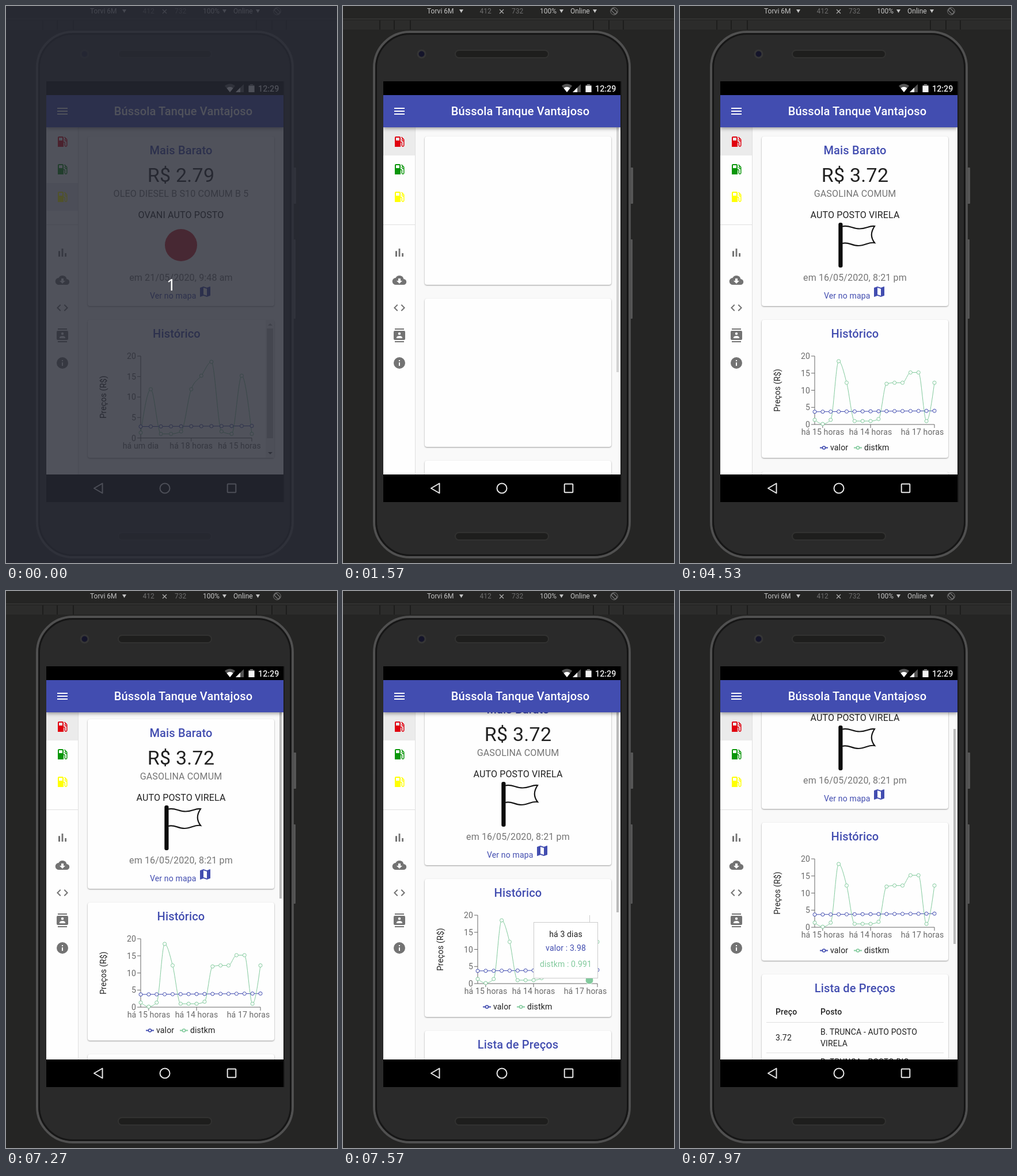
Recreate the animation shown at these times as an HTML page. Size 575 by 969 pixels, loop 8000 ms.

```html
<!DOCTYPE html>
<html lang="pt">
<head>
<meta charset="utf-8">
<style>
html, body { margin: 0; width: 100%; height: 100%; overflow: hidden; background: #252524; }
svg { display: block; width: 575px; height: 969px; font-family: Roboto, sans-serif; }
text { white-space: pre; }
.title { font-size: 20px; font-weight: 500; letter-spacing: .15px; fill: #424db0; }
.price { font-size: 34px; letter-spacing: .25px; fill: #212121; }
.body { font-size: 16px; letter-spacing: .15px; fill: #212121; }
.soft { fill: #757575; }
.small { font-size: 14px; letter-spacing: .15px; fill: #212121; }
.axis { fill: #6a6a6a; }
.blue { fill: #424db0; }
.green { fill: #82ca9d; }
.bold { font-weight: 500; }
.tool { font-size: 12px; fill: #c4c4c4; }
.dim { fill: #6e6e6e; }
.card { fill: #fefefe; filter: drop-shadow(0 1px 1px rgba(0,0,0,.38)); }
.bar { fill: #424db0; filter: drop-shadow(0 2px 3px rgba(0,0,0,.4)); }
</style>
</head>
<body>
<svg id="stage" viewBox="0 0 575 969"></svg>
<script>
const BLUE = '#424db0', GREEN = '#82ca9d', GREY = '#737373';

const rect = (x, y, w, h, fill, more = '') =>
  `<rect x="${x}" y="${y}" width="${w}" height="${h}" fill="${fill}" ${more}/>`;
const path = (d, fill, more = '') => `<path d="${d}" fill="${fill}" ${more}/>`;
const line = (d, color, width = 1, more = '') =>
  path(d, 'none', `stroke="${color}" stroke-width="${width}" ${more}`);
const circle = (x, y, r, fill, more = '') =>
  `<circle cx="${x}" cy="${y}" r="${r}" fill="${fill}" ${more}/>`;
const text = (x, y, str, cls, anchor = 'middle', more = '') =>
  `<text x="${x}" y="${y}" class="${cls}" text-anchor="${anchor}" ${more}>${str}</text>`;
const group = (id, inner, more = '') => `<g id="${id}" ${more}>${inner}</g>`;
const icon = (d, x, y, fill) => path(d, fill, `transform="translate(${x} ${y})"`);
const card = (y, h) => rect(142, y, 324, h, '#fefefe', 'class="card" rx="4"');
const caret = x => path(`M${x} 6h7l-3.5 6z`, '#c4c4c4');

const ICONS = {
  menu: 'M3 18h18v-2H3zm0-5h18v-2H3zm0-7v2h18V6z',
  gas: 'M19.77 7.23l-3.71-3.73L15 4.56l2.11 2.11a2.5 2.5 0 0 0 1.89 4.62v7.21a1 1 0 0 1-2 0V14a2 2 0 0 0-2-2h-1V5a2 2 0 0 0-2-2H6a2 2 0 0 0-2 2v16h10v-7.5h1.5v5a2.5 2.5 0 0 0 5 0V9a2.5 2.5 0 0 0-.73-1.77zM12 10H6V5h6zm6 0a1 1 0 1 1 0-2 1 1 0 0 1 0 2z',
  bars: 'M5 9.2h3V19H5zM10.6 5h2.8v14h-2.8zM16.2 13H19v6h-2.8z',
  cloud: 'M19.4 10A7.5 7.5 0 0 0 5.4 8 6 6 0 0 0 6 20h13a5 5 0 0 0 .4-10zM17 13l-5 5-5-5h3V9h4v4z',
  code: 'M9.4 16.6L4.8 12l4.6-4.6L8 6l-6 6 6 6zM14.6 16.6l4.6-4.6-4.6-4.6L16 6l6 6-6 6z',
  contact: 'M20 0H4v2h16zM4 24h16v-2H4zM20 4H4a2 2 0 0 0-2 2v12a2 2 0 0 0 2 2h16a2 2 0 0 0 2-2V6a2 2 0 0 0-2-2zm-8 2.75a2.25 2.25 0 1 1 0 4.5 2.25 2.25 0 0 1 0-4.5zM17 17H7v-1.5c0-1.7 3.3-2.5 5-2.5s5 .8 5 2.5z',
  info: 'M12 2a10 10 0 1 0 0 20 10 10 0 0 0 0-20zm1 15h-2v-6h2zm0-8h-2V7h2z',
  map: 'M20.5 3L15 5.1 9 3 3.4 4.9a.5.5 0 0 0-.4.5v15.1c0 .3.2.5.5.5L9 18.9l6 2.1 5.6-1.9a.5.5 0 0 0 .4-.5V3.5a.5.5 0 0 0-.5-.5zM15 19l-6-2.1V5l6 2.1z'
};

// Monotone cubic through evenly spaced points
function curve(pts) {
  const n = pts.length, h = pts[1][0] - pts[0][0];
  const s = pts.slice(1).map((p, i) => (p[1] - pts[i][1]) / h);
  const m = pts.map((_, i) => {
    if (!i || i === n - 1) return 0;
    const a = s[i - 1], b = s[i];
    return (Math.sign(a) + Math.sign(b)) * Math.min(Math.abs(a), Math.abs(b), Math.abs(a + b) / 4);
  });
  m[0] = (3 * s[0] - m[1]) / 2;
  m[n - 1] = (3 * s[n - 2] - m[n - 2]) / 2;
  return pts.slice(1).reduce((d, [x, y], i) => {
    const [px, py] = pts[i], k = h / 3;
    return d + `C${px + k} ${py + m[i] * k} ${x - k} ${y - m[i + 1] * k} ${x} ${y}`;
  }, 'M' + pts[0]);
}

function chart(id, { right, bottom, cost, dist, ticks }) {
  const left = 234, top = 609, n = dist.length;
  const px = i => left + (right - left) * i / (n - 1);
  const py = v => bottom - (bottom - top) * v / 20;
  const series = [
    [BLUE, dist.map((_, i) => cost[0] + (cost[1] - cost[0]) * i / (n - 1))],
    [GREEN, dist]
  ].map(([color, vals]) => [color, vals.map((v, i) => [px(i), py(v)])]);
  let out = line(`M${left} ${top}V${bottom}H${right}`, '#666');
  for (let v = 0; v <= 20; v += 5)
    out += line(`M228 ${py(v)}h6`, '#666') + text(226, py(v) + 5, v, 'small axis', 'end');
  for (const [i, x, label] of ticks)
    out += line(`M${px(i)} ${bottom}v6`, '#666') + text(x, bottom + 18, label, 'small axis');
  const mid = (top + bottom) / 2;
  out += text(174, mid, 'Preços (R$)', 'small', 'middle', `transform="rotate(-90 174 ${mid})"`);
  out += series.map(([c, p], i) =>
    line(curve(p), c, 1, `id="${id}Line${i}" pathLength="1" stroke-dasharray="1 2"`)).join('');
  out += group(id + 'Dots', series.map(([c, p]) =>
    p.map(([x, y]) => circle(x, y, 3, '#fff', `stroke="${c}"`)).join('')).join(''));
  return out;
}

const offer = (price, fuel, station, date) =>
  card(227, 295) +
  text(304, 258, 'Mais Barato', 'title') + text(304, 306, price, 'price') +
  text(304, 332, fuel, 'body soft') + text(304, 369, station, 'body') +
  text(304, 478, date, 'body soft') + text(250, 509, 'Ver no mapa', 'small blue', 'start') +
  icon(ICONS.map, 334, 485, BLUE);

const legend = (x, name, color) =>
  line(`M${x} 768.5h14`, color, 2) + circle(x + 7, 768.5, 2.5, '#fefefe', `stroke="${color}" stroke-width="1.6"`) +
  text(x + 18, 773, name, 'small', 'start');

const flag = rect(275.3, 377, 7.2, 78, '#0c0c0c', 'rx="3"') +
  line('M282 383.5C293 380.5 300 387.5 312 387.5S328 382 338 383C331 394 331 402 338 412C328 410 322 417 310 417S293 410 282 413', '#161616', 2.2);

const diesel =
  offer('R$ 2.79', 'OLEO DIESEL B S10 COMUM B 5', 'OVANI AUTO POSTO', 'em 21/05/2020, 9:48 am') +
  circle(304, 416, 28, '#d0222a') +
  card(546, 240) + text(296.5, 577, 'Histórico', 'title') +
  chart('old', {
    right: 427, bottom: 751.5, cost: [2.79, 2.95],
    dist: [1.3, 11.9, 1, 1, 1.6, 11.9, 15.2, 18.6, 1.6, 1, 15.2, 1],
    ticks: [[0, 234, 'há um dia'], [5, 321.7, 'há 18 horas'], [11, 405.5, 'há 15 horas']]
  }) +
  rect(451, 546, 15, 240, '#f1f1f1') + rect(453, 561, 11, 191, '#c1c1c1') +
  path('M455 556h8l-4-4z', '#a3a3a3') + path('M455 776h8l-4 4z', '#505050');

const tip = line('M428.5 609V728', '#ccc') +
  circle(428, 722, 7, GREEN, 'stroke="#fff"') +
  rect(331.5, 621.5, 111, 97, '#fff', 'stroke="#ccc"') +
  text(387, 647, 'há 3 dias', 'small') + text(387, 671, 'valor : 3.98', 'small blue') +
  text(387, 699, 'distkm : 0.991', 'small green');

const petrol =
  offer('R$ 3.72', 'GASOLINA COMUM', 'AUTO POSTO VIRELA', 'em 16/05/2020, 8:21 pm') + flag +
  card(546, 240) + text(304, 577, 'Histórico', 'title') +
  chart('new', {
    right: 442, bottom: 728, cost: [3.72, 3.99],
    dist: [1.35, .15, 1.35, 18.5, 12.2, 1, 1, 1, 1.6, 11.9, 12.2, 12.2, 15.2, 15.2, .99, 12.2],
    ticks: [[1, 248, 'há 15 horas'], [7, 331, 'há 14 horas'], [15, 421, 'há 17 horas']]
  }) +
  legend(243, 'valor', BLUE) + legend(302, 'distkm', GREEN) + group('tip', tip) +
  card(810, 320) + text(304, 841, 'Lista de Preços', 'title') +
  text(166, 880, 'Preço', 'small bold', 'start') + text(244, 880, 'Posto', 'small bold', 'start') +
  line('M150 893.5h308M150 946.5h308', '#e0e0e0') +
  text(166, 925, '3.72', 'small', 'start') +
  text(244, 915, 'B. TRUNCA - AUTO POSTO', 'small', 'start') + text(244, 935, 'VIRELA', 'small', 'start') +
  text(244, 967, 'B. TRUNCA - POSTO RIO', 'small', 'start');

const drawer =
  rect(70, 211, 55, 604, '#fefefe') +
  group('selOld', rect(70, 308, 55, 48, '#e9e9ee')) + group('selNew', rect(70, 211, 55, 49, '#ebebeb')) +
  line('M125.5 211V815M70 380.5h55', '#e0e0e0') +
  ['#e0000f', '#0a960a', '#ffff00'].map((c, i) => icon(ICONS.gas, 86, 224 + 48 * i, c)).join('') +
  ['bars', 'cloud', 'code', 'contact', 'info'].map((k, i) => icon(ICONS[k], 86, 417 + 48 * i, GREY)).join('');

const header = rect(70, 155, 412, 56, BLUE, 'class="bar"') + icon(ICONS.menu, 86, 171, '#fff') +
  text(308, 190, 'Bússola Tanque Vantajoso', 'title', 'middle', 'style="fill:#fff"');

const toolbar =
  text(146, 13, 'Torvi 6M', 'tool', 'start') + caret(202) +
  text(237.5, 13, '412', 'tool dim', 'start') + line('M272 6l7 7m0-7l-7 7', '#b0b0b0', 1.2) +
  text(293, 13, '732', 'tool dim', 'start') +
  text(342, 13, '100%', 'tool', 'start') + caret(376) +
  text(395, 13, 'Online', 'tool', 'start') + caret(434) +
  circle(471, 9, 6.3, 'none', 'stroke="#777"') +
  rect(468.5, 4, 5, 10, '#252524', 'stroke="#8a8a8a" rx="1" transform="rotate(-45 471 9)"') +
  line('M0 22.5H575', '#3d3d3d') + rect(0, 25, 575, 16, '#2c2c2b') +
  line('M64 25v16M89 25v16M117 25v16M435 25v16M462 25v16M487 25v16', '#1d1d1c', 2);

const slot = y => rect(195, y, 162, 13, '#1e1e1d', 'rx="6.5" stroke="#323231" stroke-width="2"');
const phone =
  rect(499, 281, 5, 63, '#565656', 'rx="1"') + rect(499, 406, 4, 138, '#565656', 'rx="1"') +
  rect(54, 45, 444, 914, '#2a2a2a', 'rx="62" stroke="#505050" stroke-width="4"') +
  rect(57.5, 48.5, 437, 907, '#2a2a2a', 'rx="59" stroke="#161616" stroke-width="3"') +
  slot(77) + slot(916) + rect(482, 131, 2, 732, '#1c1c1c') +
  circle(136.5, 83.5, 6.5, '#14142a', 'stroke="#353535" stroke-width="3"');

const system =
  rect(70, 131, 412, 24, '#000') +
  path('M380 139a13 13 0 0 1 18 0l-9 11z', '#555') + path('M383.5 143a8 8 0 0 1 11 0l-5.5 7z', '#fff') +
  path('M413 136v14h-14z', '#555') + path('M407 142v8h-8z', '#fff') +
  path('M421.5 137.5h2.5v-1.5h5v1.5h2.5v12.5h-10z', '#777') + rect(421.5, 139, 10, 11, '#f2f2f2') +
  text(438, 149, '12:29', 'bold', 'start', 'fill="#eee" font-size="14.3"') +
  rect(70, 815, 412, 48, '#000') +
  line('M153 839l14.5-8.5v17z', '#e8e8e8', 2, 'stroke-linejoin="round"') +
  circle(276, 839, 8.5, 'none', 'stroke="#e8e8e8" stroke-width="2"') +
  rect(384.7, 831.5, 14.6, 14.8, 'none', 'stroke="#e8e8e8" stroke-width="2" rx="1"');

const $ = id => document.getElementById(id);

$('stage').innerHTML =
  '<clipPath id="view"><path d="M126 211h356v604H126z"/></clipPath>' +
  '<clipPath id="screen"><path d="M70 131h412v684H70z"/></clipPath>' +
  rect(0, 0, 575, 969, '#252524') + toolbar + phone +
  rect(70, 154, 412, 661, '#f9f9f9') +
  group('body', group('diesel', diesel) +
    group('empty', card(227, 258) + card(509, 258) + card(791, 258)) +
    group('petrol', petrol) +
    rect(475, 159, 4, 478, '#000', 'id="thumbA" fill-opacity=".25"') +
    rect(475, 159, 4, 374, '#000', 'id="thumbB" fill-opacity=".25"'), 'clip-path="url(#view)"') +
  group('shell', drawer + header, 'clip-path="url(#screen)"') +
  group('blank', rect(70, 154, 412, 661, '#fefefe')) +
  group('status', path('M70 791h131a4 4 0 0 1 4 4v20h-135z', '#000') +
    text(75, 808, 'Aguardando me…', '', 'start',
      'fill="#f2f2f2" style="font:14.6px \'Noto Sans\',sans-serif"')) +
  system +
  group('dim', rect(0, 0, 575, 969, '#282a36', 'fill-opacity=".81"') +
    text(287, 495, '1', '', 'middle', 'fill="#fff" style="font:28px \'Noto Sans\',sans-serif"'));

const LOOP = 8000, HOLD = 'steps(1, end)';
const run = (id, keys) => $(id).animate(
  keys.map(([t, props, easing = HOLD]) => ({ offset: t / LOOP, easing, ...props })),
  { duration: LOOP, iterations: Infinity });

// Visible from one time to another; offsets stay distinct at both loop ends
function show(id, from, to) {
  const keys = [[from, { opacity: 1 }]];
  if (from > 0) keys.unshift([0, { opacity: 0 }]);
  if (to < LOOP) keys.push([to, { opacity: 0 }]);
  keys.push([LOOP, { opacity: to < LOOP ? 0 : 1 }]);
  run(id, keys);
}

show('dim', 0, 30);
show('status', 30, 900);
show('diesel', 0, 370);
show('selOld', 0, 370);
show('blank', 370, 900);
show('selNew', 900, LOOP);
show('empty', 967, 2900);
show('petrol', 2900, LOOP);
show('newDots', 4530, LOOP);
show('tip', 7370, 7770);
show('thumbB', 7270, LOOP);
run('thumbA', [[0, { opacity: 0 }], [967, { opacity: 1 }], [1470, { opacity: 1 }, 'linear'],
  [1730, { opacity: 0 }], [LOOP, { opacity: 0 }]]);

for (const id of ['newLine0', 'newLine1'])
  run(id, [[0, { strokeDashoffset: 1 }], [2970, { strokeDashoffset: 1 }, 'ease'],
    [4500, { strokeDashoffset: 0 }], [LOOP, { strokeDashoffset: 0 }]]);

// Accelerating drag of the page, in whole pixels
const pos = [[0, 0]];
for (let i = 0; i <= 21; i++) {
  const s = i / 30;
  pos.push([7269 + s * 1000, Math.round(4 + 90.2 * s + 154.8 * s * s)]);
}
pos.push([LOOP, 143]);
const slide = (id, rate) => run(id, pos.map(([t, y]) =>
  [t, { transform: `translateY(${Math.round(y * rate)}px)` }]));
slide('petrol', -1);
slide('thumbB', .567);
</script>
</body>
</html>
```
